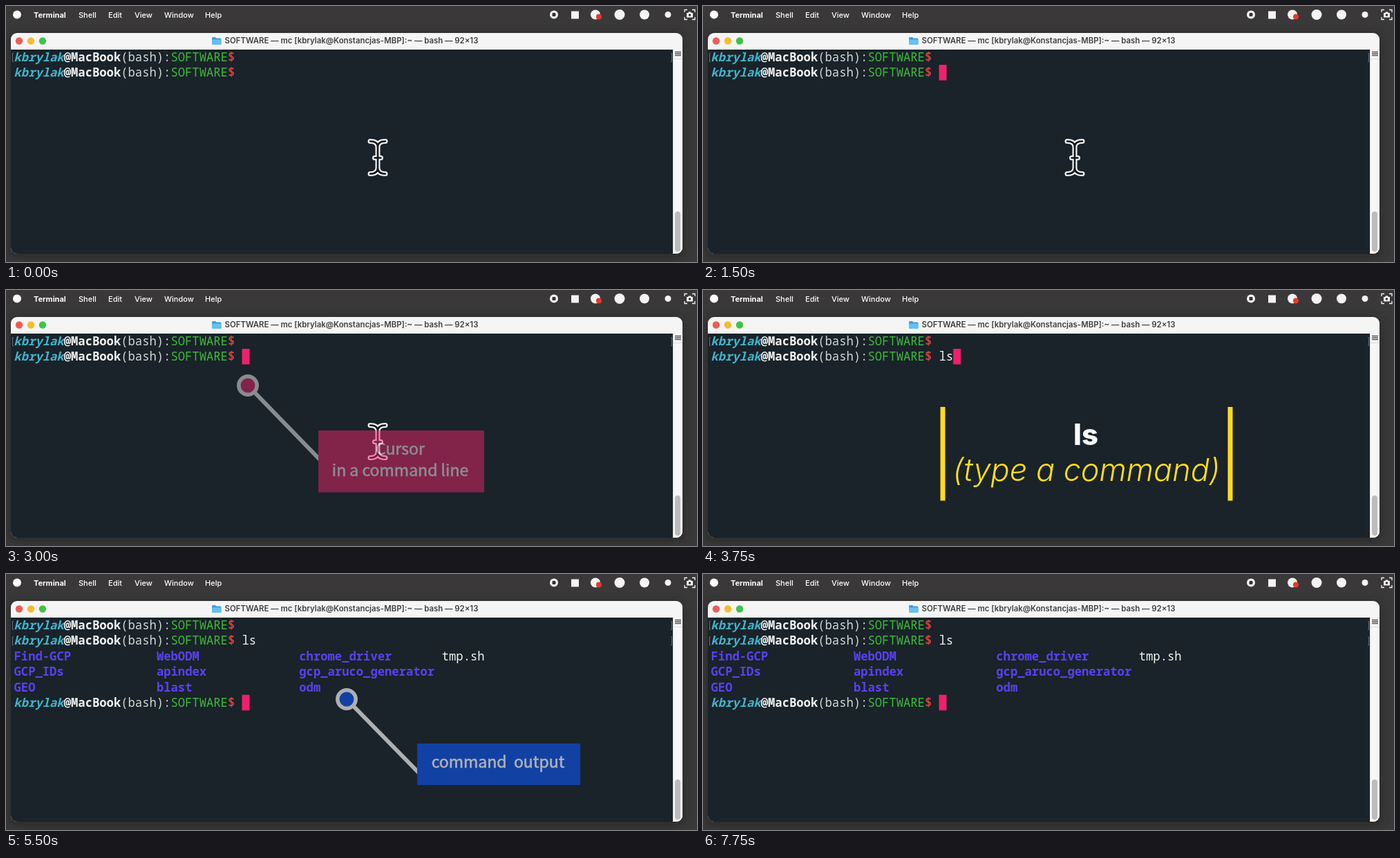
Write an HTML page that moves like this. It is 1000 px wide and 370 px high and loops after 8 s.

```html
<!DOCTYPE html>
<html lang="en">
<head>
<meta charset="utf-8">
<title>Command line basics</title>
<style>
  html, body { margin: 0; width: 100%; height: 100%; overflow: hidden; background: #3a3939; }
  svg { display: block; width: 100%; height: 100%; }
  text { white-space: pre; }

  .menu { font: 500 11px Inter, sans-serif; fill: #fff; }
  .menu .app { font-weight: 700; }
  .title { font: 600 11.4px Inter, sans-serif; fill: #404040; text-anchor: middle; }
  .term { font: 500 17.2px "Noto Sans Mono", monospace; fill: #f2f2f2; }
  .term .b { font-weight: 700; }
  .user { fill: #42b4cb; font-style: italic; }
  .shell { fill: #d4d6d6; }
  .path { fill: #40b93c; }
  .sign { fill: #d8423e; }
  .dir { fill: #5b41ee; font-weight: 700; }
  .mark { fill: none; stroke: #66727a; }
  .label {
    font: 500 23px "Noto Sans CJK SC", "Noto Sans CJK JP", "Noto Sans CJK", "Noto Sans", sans-serif;
    fill: #fafafa; stroke: #fafafa; stroke-width: .6; text-anchor: middle;
  }
  .line { stroke: #f8f5f6; stroke-width: 6; }
  .ring { stroke: #f8f5f6; stroke-width: 5.5; }
  .pink { fill: #ec246c; }
  .blue { fill: #1050e2; }
  .caption text { text-anchor: middle; font-family: Inter, sans-serif; }
  .key { font-size: 42px; font-weight: 800; fill: #fff; }
  .hint { font-size: 45px; font-weight: 300; font-style: italic; font-feature-settings: "cv11"; fill: #ffdc1c; }

  /* 250 ms is 3.125% of the loop */
  .cursor { animation: blink 8s step-end infinite; }
  .caret { animation: caret 8s step-end infinite; }
  .beam { animation: beam 8s step-end infinite; }
  .key-l { animation: key-l 8s step-end infinite; }
  .key-s { animation: key-s 8s step-end infinite; }
  .output { animation: output 8s step-end infinite; }
  .note1 { animation: note1 8s step-end infinite; }
  .note2 { animation: note2 8s step-end infinite; }
  .caption { animation: caption 8s step-end infinite; }

  @keyframes blink {
    0%, 12.5%, 28.125%, 59.375%, 75%, 90.625% { opacity: 0; }
    3.125%, 18.75%, 34.375%, 65.625%, 81.25%, 96.875%, 100% { opacity: 1; }
  }
  @keyframes caret {
    0% { transform: translate(0, 0); }
    40.625% { transform: translate(10.32px, 0); }
    43.75% { transform: translate(20.64px, 0); }
    59.375%, 100% { transform: translate(0, 89.6px); }
  }
  @keyframes beam { 0% { opacity: 1; } 40.625%, 100% { opacity: 0; } }
  @keyframes key-l { 0% { opacity: 0; } 40.625%, 100% { opacity: 1; } }
  @keyframes key-s { 0% { opacity: 0; } 43.75%, 100% { opacity: 1; } }
  @keyframes output { 0% { opacity: 0; } 59.375%, 100% { opacity: 1; } }
  @keyframes note1 {
    0% { opacity: 0; }
    21.875% { opacity: .1; animation-timing-function: steps(3); }
    31.25% { opacity: .94; }
    34.375% { opacity: 1; animation-timing-function: steps(2); }
    40.625%, 100% { opacity: 0; }
  }
  @keyframes caption {
    0% { opacity: 0; }
    40.625% { opacity: 0; animation-timing-function: steps(2); }
    46.875% { opacity: 1; }
    53.125% { opacity: 1; animation-timing-function: steps(2); }
    59.375%, 100% { opacity: 0; }
  }
  @keyframes note2 {
    0% { opacity: 0; }
    62.5% { opacity: 0; animation-timing-function: steps(3); }
    71.875% { opacity: 1; }
    81.25% { opacity: 1; animation-timing-function: steps(3); }
    90.625%, 100% { opacity: 0; }
  }
</style>
</head>
<body>
<svg viewBox="0 0 1000 370" preserveAspectRatio="none">
  <defs>
    <clipPath id="frame"><rect x="7" y="39" width="972" height="319" rx="9"/></clipPath>
    <filter id="soft" x="-5%" y="-10%" width="110%" height="120%"><feGaussianBlur stdDeviation="6"/></filter>
    <text id="prompt" class="term" x="11.5" y="80"><tspan class="b user">kbrylak</tspan><tspan class="b">@MacBook</tspan><tspan class="shell">(bash):</tspan><tspan class="path">SOFTWARE</tspan><tspan class="b sign">$</tspan></text>
    <path id="marks" class="mark" d="M11 68.5H9.500V80.5H11M962 68.5H963.5V80.5H962"/>
    <path id="ibeam" d="M527 195.5Q538 195.5 538 204V234Q538 242.5 527 242.5M549 195.5Q538 195.5 538 204M538 234Q538 242.5 549 242.5M533.5 219.5H542.5"/>
  </defs>

  <!-- desktop and menu bar -->
  <rect width="1000" height="370" fill="#3a3939"/>
  <rect x="4" y="40" width="978" height="324" rx="10" fill="#222" opacity=".55" filter="url(#soft)"/>
  <rect width="1000" height="26" fill="#3a3838"/>
  <g class="menu">
    <circle cx="16" cy="12.5" r="6"/>
    <text class="app" x="40" y="16.5">Terminal</text>
    <text x="105" y="16.5">Shell</text>
    <text x="148" y="16.5">Edit</text>
    <text x="186" y="16.5">View</text>
    <text x="229" y="16.5">Window</text>
    <text x="288" y="16.5">Help</text>
  </g>
  <g fill="#f4f4f4">
    <circle cx="793" cy="12.5" r="6"/>
    <rect x="790.5" y="10" width="5" height="5" rx="1" fill="#333"/>
    <rect x="818" y="7.5" width="11" height="11"/>
    <circle cx="853" cy="12.5" r="7"/>
    <circle cx="858" cy="15.5" r="4" fill="#e23a2e"/>
    <circle cx="888" cy="12.5" r="7.5"/>
    <circle cx="924" cy="12.5" r="7"/>
    <circle cx="958" cy="12.5" r="4.5"/>
    <path d="M982 9V5.5H986M993 5.5H997V9M997 16V19.5H993M986 19.5H982V16" fill="none" stroke="#f4f4f4" stroke-width="1.3"/>
    <path d="M985 10H987L988 8.5H991L992 10H994V16.5H985Z"/>
    <circle cx="989.5" cy="13" r="1.8" fill="#3a3838"/>
  </g>

  <!-- window -->
  <g clip-path="url(#frame)">
    <rect x="7" y="39" width="972" height="319" fill="#f5f5f5"/>
    <rect x="7" y="63" width="958" height="295" fill="#192329"/>
    <rect x="965" y="63" width="14" height="295" fill="#f7f7f7"/>
    <path d="M965.5 63V358M965 76.5H979" stroke="#dcdcdc"/>
    <rect x="968" y="297" width="8" height="58" rx="4" fill="#bcbcbc"/>
    <path d="M968 66.5H977M968 69H977M968 71.5H977" stroke="#555" stroke-width="1.3"/>
  </g>
  <circle cx="19" cy="50.5" r="5.2" fill="#ee5c55"/>
  <circle cx="36" cy="50.5" r="5.2" fill="#f4bc30"/>
  <circle cx="53" cy="50.5" r="5.2" fill="#3fc446"/>
  <path d="M298 46.5Q298 45 299.5 45H303L304.5 46.5H310Q311.5 46.5 311.5 48V54.5Q311.5 56 310 56H299.5Q298 56 298 54.5Z" fill="#3d9fdc"/>
  <rect x="298" y="48.5" width="13.5" height="7.5" rx="1.2" fill="#66c0f0"/>
  <text class="title" x="500" y="54.3">SOFTWARE — mc [kbrylak@Konstancjas-MBP]:~ — bash — 92×13</text>

  <!-- terminal -->
  <use href="#marks"/>
  <use href="#prompt"/>
  <use href="#prompt" y="22.4"/>
  <g class="term">
    <text class="key-l" x="341.4" y="102.4">l</text>
    <text class="key-s" x="351.7" y="102.4">s</text>
  </g>
  <g class="output">
    <use href="#marks" y="22.4"/>
    <g class="term">
      <g class="dir">
        <text x="11.5" y="124.8">Find-GCP</text>
        <text x="11.5" y="147.2">GCP_IDs</text>
        <text x="11.5" y="169.6">GEO</text>
        <text x="217.9" y="124.8">WebODM</text>
        <text x="217.9" y="147.2">apindex</text>
        <text x="217.9" y="169.6">blast</text>
        <text x="424.3" y="124.8">chrome_driver</text>
        <text x="424.3" y="147.2">gcp_aruco_generator</text>
        <text x="424.3" y="169.6">odm</text>
      </g>
      <text x="630.7" y="124.8">tmp.sh</text>
    </g>
    <use href="#prompt" y="112"/>
  </g>
  <g class="caret"><rect class="cursor" x="341.5" y="85" width="11" height="22.5" fill="#f0206d"/></g>

  <!-- mouse pointer -->
  <g class="beam" fill="none" stroke-linecap="round">
    <use href="#ibeam" stroke="#f4f4f4" stroke-width="7"/>
    <use href="#ibeam" stroke="#11181c" stroke-width="2.6"/>
  </g>

  <!-- notes -->
  <g class="note1">
    <path class="line" d="M350 138L455 246"/>
    <circle class="ring pink" cx="350" cy="138" r="13.2"/>
    <rect class="pink" x="452" y="203" width="240" height="89.5"/>
    <text class="label" x="570.5" y="238">Cursor</text>
    <text class="label" x="570.5" y="269">in a command line</text>
  </g>
  <g class="caption">
    <path d="M347 169V304.5M763 169V304.5" stroke="#ffdc1c" stroke-width="7"/>
    <text class="key" x="554" y="224">ls</text>
    <text class="hint" x="555" y="276">(type a command)</text>
  </g>
  <g class="note2">
    <path class="line" d="M493 181L598 288"/>
    <circle class="ring blue" cx="493" cy="181" r="13.2"/>
    <rect class="blue" x="595" y="245" width="236" height="60"/>
    <text class="label" x="712" y="280">command  output</text>
  </g>
</svg>
</body>
</html>
```
